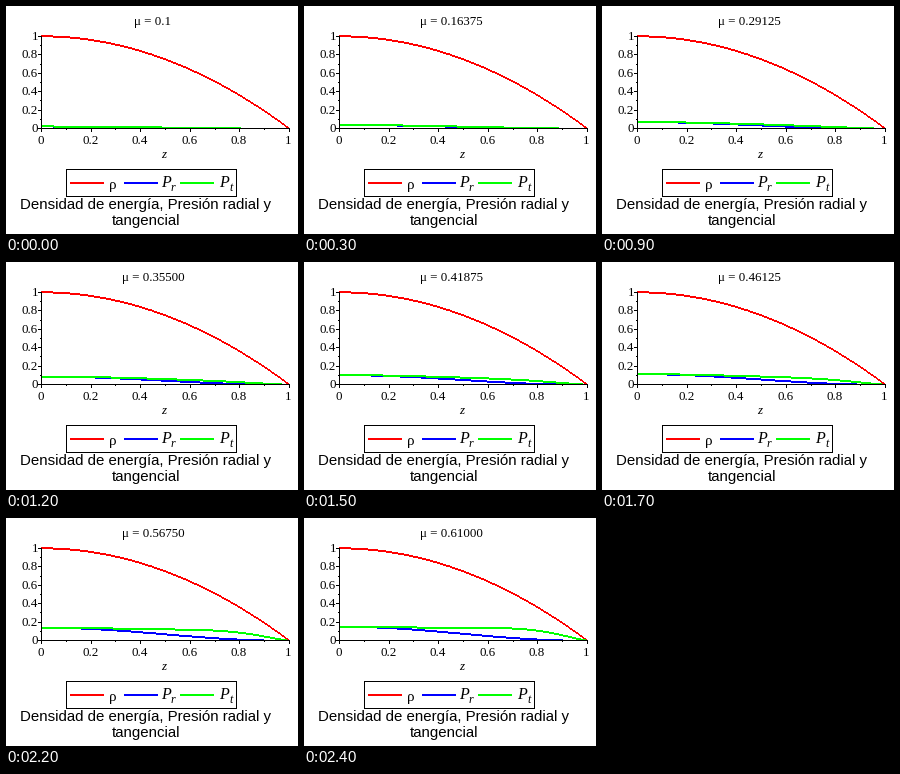
These frames come from a looping animation (292 px wide and 228 px high, 2.5 s). A matplotlib script:

```python
import matplotlib.pyplot as plt
import numpy as np
from matplotlib.animation import FuncAnimation
from matplotlib.patches import Rectangle

W, H, DPI = 292, 228, 64
PT = 72 / DPI  # points per pixel
FRAMES, INTERVAL = 25, 100
MU_START, MU_END = 0.1, 0.61
X0, Y0, XLEN, YLEN = 35, 122, 248, 92
RED, BLUE, GREEN = "#ff0000", "#0000ff", "#00ff00"
SERIF, SANS = "Liberation Serif", "Liberation Sans"

# One sample per pixel column
z = np.linspace(0, 1, XLEN + 1)
edges = np.arange(X0, X0 + XLEN + 2)
density = 1 - z**2

fig = plt.figure(figsize=(W / DPI, H / DPI), dpi=DPI, facecolor="white")
ax = fig.add_axes([0, 0, 1, 1])


def label(x, y, text, size=13, ha="center", font=SERIF, style="normal"):
    return ax.text(x, y, text, fontsize=size * PT, ha=ha, va="baseline",
                   family=font, style=style)


def bar(x, y, w, h, color="black"):
    ax.add_patch(Rectangle((x, y), w, h, fc=color, lw=0,
                           antialiased=False, zorder=4))


def band(values):
    """Top and bottom of a two pixel pen, cut off at the axis."""
    top = Y0 - np.round((YLEN + 0.5) * values + 0.2)
    return top, np.minimum(top + 2, Y0 + 1)


def curve(values, color):
    top, bottom = band(values)
    return ax.stairs(top, edges, baseline=bottom, fill=True, color=color,
                     lw=0, antialiased=False, zorder=3)


def pressures(mu):
    """Radial and tangential pressure of an anisotropic sphere."""
    mass = (5 * z - 3 * z**3) / 2
    radial = mu / 4 * density**2 * (1 - z**2 / 2)
    gravity = mu / 2 * (mass + 7.5 * z * radial) / (1 - mu * z * mass)
    tangential = radial + z / 2 * ((density + radial) * gravity
                                   - mu / 2 * density * mass)
    return radial, tangential


def draw_axes():
    bar(X0, Y0 - YLEN, 1, YLEN + 1)
    bar(X0, Y0, XLEN + 1, 1)
    for i in range(11):
        x = X0 + round(XLEN * i / 10)
        y = Y0 - round(YLEN * i / 10)
        size = 2 if i % 2 else 4
        bar(x, Y0 + 1, 1, size - 1)
        bar(X0 - size + 1, y, size - 1, 1)
        if i % 2 == 0:
            text = f"{i / 10:g}"
            label(x - 0.5, 138, text)
            label(32, y + 4, text, ha="right")
    label(158, 152, "z", style="italic")


def draw_legend():
    for y in (163, 190):
        bar(60, y, 171, 1)
    for x in (60, 230):
        bar(x, 163, 1, 28)
    for x, color in ((64, RED), (118, BLUE), (174, GREEN)):
        bar(x, 176, 34, 2, color)
    label(103, 183, "ρ", 15, "left")
    for x, sub in ((155, "r"), (213, "t")):
        label(x, 181, "P", 16, "left", style="italic")
        label(x + 10, 185, sub, 12, "left", style="italic")


draw_axes()
draw_legend()
label(139, 203, "Densidad de energía, Presión radial y", 15, font=SANS)
label(140, 219, "tangencial", 15, font=SANS)
title = label(147, 19, "")

curve(density, RED)
moving = [curve(p, c) for p, c in zip(pressures(MU_START), (BLUE, GREEN))]

ax.set_xlim(0, W)
ax.set_ylim(H, 0)
ax.axis("off")


def update(i):
    mu = MU_START + (MU_END - MU_START) * i / (FRAMES - 1)
    title.set_text(f"μ = {mu:.5f}" if i else f"μ = {mu:g}")
    for patch, values in zip(moving, pressures(mu)):
        top, bottom = band(values)
        patch.set_data(top, edges, bottom)
    return [title, *moving]


anim = FuncAnimation(fig, update, frames=FRAMES, interval=INTERVAL,
                     repeat=True, repeat_delay=0, blit=False)
plt.show()
```
